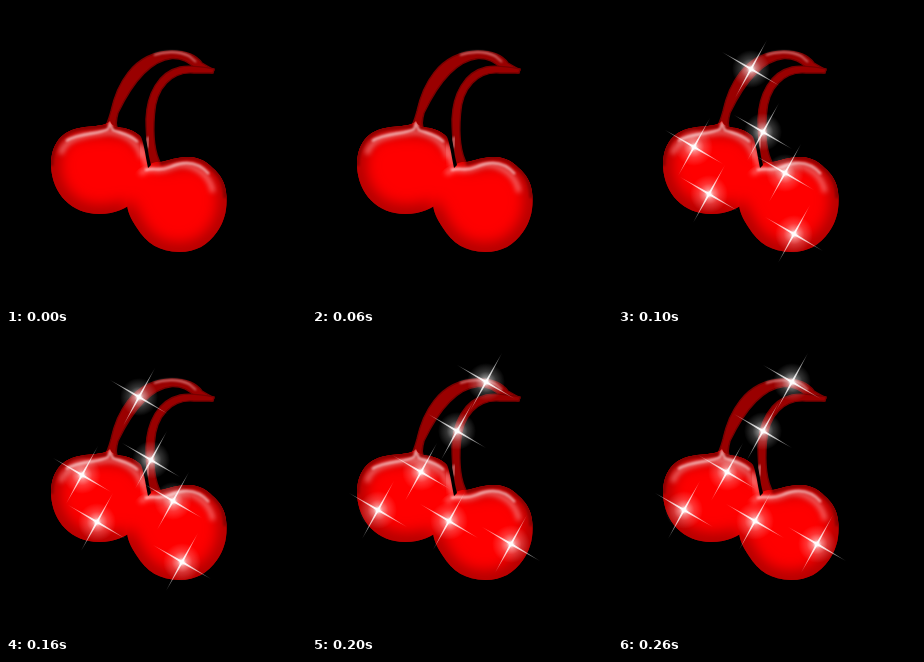
An HTML page that plays this animation: 300 by 300 pixels, repeating every 300 ms.

```html
<!DOCTYPE html>
<html lang="en">
<head>
<meta charset="utf-8">
<title>Sparkling cherries</title>
<style>
  html, body { margin: 0; width: 100%; height: 100%; overflow: hidden; background: #000; }
  svg { display: block; width: 300px; height: 300px; }
  path { fill: none; }
  .twinkle { opacity: 0; }
  .soft1 { filter: url(#soft1); }
  .soft2 { filter: url(#soft2); }
  .soft8 { filter: url(#soft8); }
  .body { fill: #f00; }
  .shade { stroke: #900000; stroke-width: 13; }
  .rim { stroke: #8c0000; stroke-width: 5; }
  .sheen { stroke: #ff9c9c; stroke-width: 5; opacity: .6; }
  .shine { stroke: #fff; stroke-width: 2.4; opacity: .6; }
  .stem { fill: #9a0000; stroke: #780000; stroke-width: 1.4; }
</style>
</head>
<body>
<svg viewBox="0 0 300 300">
  <defs>
    <filter id="soft1" x="-30%" y="-30%" width="160%" height="160%"><feGaussianBlur stdDeviation="1"/></filter>
    <filter id="soft2" x="-30%" y="-30%" width="160%" height="160%"><feGaussianBlur stdDeviation="2.4"/></filter>
    <filter id="soft8" x="-30%" y="-30%" width="160%" height="160%"><feGaussianBlur stdDeviation="8"/></filter>
    <clipPath id="inLeft">
      <path d="M104 115 C106 121 111 121 118 122 C130 125 138 131 141 142 L146 170 L128 196 C120 202 110 208 93 208 C66 208 46 188 45 160 C45 143 51 130 66 124 C78 119 98 122 104 115 Z"/>
    </clipPath>
    <clipPath id="inRight">
      <path d="M150 156 C158 157 164 152 180 151 C194 150 202 157 209 164 C216 171 219 178 220 186 C222 201 219 215 211 226 C202 239 190 246 173 246 C154 246 140 237 131 222 C124 212 120 203 121 192 C121 178 126 166 137 160 Z"/>
    </clipPath>
    <radialGradient id="glow">
      <stop offset="0" stop-color="#fff" stop-opacity=".9"/>
      <stop offset=".2" stop-color="#fff" stop-opacity=".55"/>
      <stop offset=".55" stop-color="#fff" stop-opacity=".2"/>
      <stop offset="1" stop-color="#fff" stop-opacity="0"/>
    </radialGradient>
    <radialGradient id="ray" gradientUnits="userSpaceOnUse" cx="0" cy="0" r="33">
      <stop offset="0" stop-color="#fff"/>
      <stop offset=".5" stop-color="#fff" stop-opacity=".65"/>
      <stop offset="1" stop-color="#fff" stop-opacity=".25"/>
    </radialGradient>
    <g id="spark">
      <circle r="19" fill="url(#glow)"/>
      <path d="M16 -29 L.9 .5 L-16 29 L-.9 -.5 Z M-29 -17 L.5 -.9 L29 17 L-.5 .9 Z" style="fill: url(#ray)"/>
      <circle class="soft1" r="2.6" fill="#fff"/>
    </g>
  </defs>

  <rect width="300" height="300"/>

  <path class="stem" d="M99 121 C102 116 103 112 105 105 C110 82 125 45.5 166 45 C182 45 191 50 196 57 L208 64 L206 67 L190 63 C182 56 176 52 166 52.5 C142 55 124 82 112 107 C110 114 109 119 112 123 Z"/>
  <path class="stem" d="M143 158 C142 145 140 130 140 113 C141 88 152 66 174 61 C183 59 192 60 208 63 L207 67 L188 67 C166 65 150 82 148.5 108 C147 126 148 146 155 158 Z"/>
  <path class="soft1" d="M148 49 C159 45 173 45 183 50 L190 56" stroke="#f0a5a5" stroke-width="1.6" opacity=".8"/>

  <g clip-path="url(#inLeft)">
    <rect class="body" x="40" y="110" width="110" height="100"/>
    <path class="shade soft8" d="M122 201 C110 208 104 208 93 208 C66 208 46 188 45 160 C45 143 51 130 66 124 C86 118 112 120 125 124 C136 129 140 135 142 144"/>
    <path class="sheen soft2" d="M55 148 C58 132 78 129 103 126 C121 128 132 136 136 152"/>
    <path class="shine soft1" d="M60 135 C74 126 92 129 102 123 L104 117 L107 124 C114 127 124 128 132 136"/>
    <path class="rim soft1" d="M45 160 C45 143 51 130 66 124 C78 119 92 122 100 119 M108 120 C125 122 138 129 141 142"/>
  </g>

  <g clip-path="url(#inRight)">
    <rect class="body" x="115" y="145" width="110" height="105"/>
    <path class="shade soft8" d="M150 155 C160 157 164 152 180 151 C201 151 217 165 220 184 C223 201 219 215 211 226 C202 239 190 246 173 246 C154 246 140 237 131 222 C124 212 121 203 121 198"/>
    <path class="sheen soft2" d="M134 168 C144 159 151 168 164 162 C180 154 203 164 207 186"/>
    <path class="shine soft1" d="M139 164 C149 161 152 166 164 161 C180 154 193 156 203 168"/>
    <path class="rim soft1" d="M154 157 C162 155 167 152 180 151 C194 150 202 157 209 164 C216 171 219 178 220 192"/>
  </g>

  <path class="soft2" d="M136 139 C138 149 139 156 141 161" stroke="#ffa8a8" stroke-width="4" opacity=".7"/>
  <path class="soft1" d="M142 131 L141 142" stroke="#efaaaa" stroke-width="2.2" opacity=".8"/>
  <path d="M134 128 C138 137 139 147 142 162 L145 159 C142 149 142 139 139 130 Z" style="fill: #000"/>

  <g id="sparks"></g>
</svg>
<script>
  const NS = "http://www.w3.org/2000/svg";
  const LOOP = 300;
  const twinkles = [
    { from: 100, to: 200, at: [[133, 63], [145, 126], [76, 141], [167, 167], [91, 188], [176, 228]] },
    { from: 200, to: 300, at: [[174, 48], [145, 97], [109, 138], [66, 176], [137, 187], [199, 210]] }
  ];

  function add(parent, tag, attrs) {
    const node = document.createElementNS(NS, tag);
    for (const key in attrs) node.setAttribute(key, attrs[key]);
    return parent.appendChild(node);
  }

  const layer = document.getElementById("sparks");
  for (const t of twinkles) {
    t.group = add(layer, "g", { class: "twinkle" });
    for (const [x, y] of t.at) add(t.group, "use", { href: "#spark", x, y });
  }

  const start = performance.now();
  function draw() {
    const time = (performance.now() - start) % LOOP;
    for (const t of twinkles) {
      t.group.style.opacity = time >= t.from && time < t.to ? 1 : 0;
    }
    requestAnimationFrame(draw);
  }
  draw();
</script>
</body>
</html>
```
